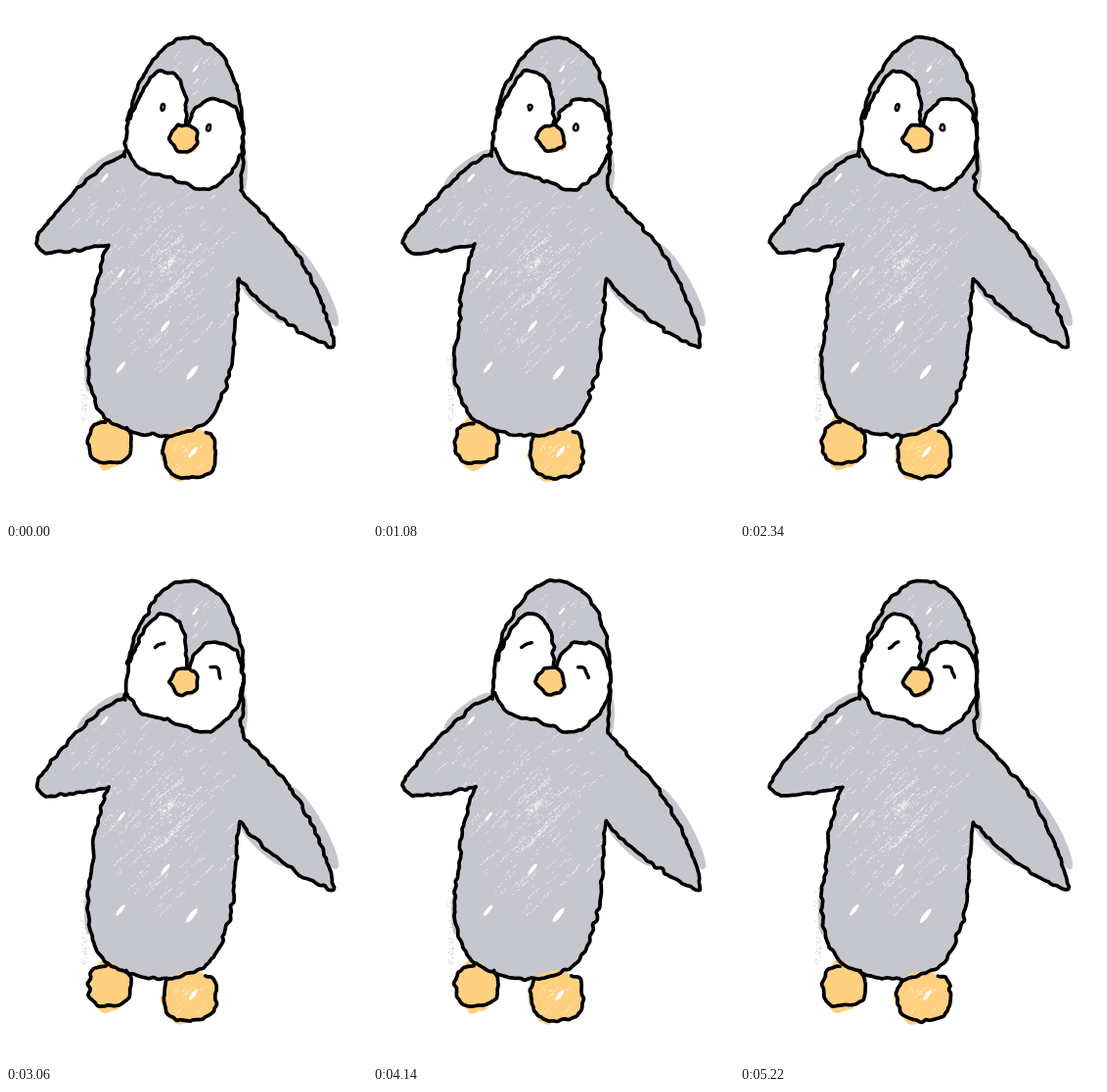
An HTML page with a canvas for the animation above (5400 ms loop, 369 by 526 pixels).

```html
<!DOCTYPE html>
<html lang="en">
<head>
<meta charset="utf-8">
<title>Penguin</title>
<style>
  html, body { margin: 0; width: 100%; height: 100%; overflow: hidden; background: #fff; }
  canvas { display: block; }
</style>
</head>
<body>
<canvas id="stage" width="369" height="526"></canvas>
<script>
const ctx = document.getElementById('stage').getContext('2d');
const STEP = 180, COUNT = 30, SHUT = 15;
const GREY = '#c6c6ce', ORANGE = '#ffd080', INK = '#000', PAPER = '#fff';

function hash(x, y, s) {
  let h = Math.imul(x, 374761393) ^ Math.imul(y, 668265263) ^ Math.imul(s + 7, 1442695041);
  h = Math.imul(h ^ (h >>> 13), 1274126177);
  return ((h ^ (h >>> 16)) >>> 0) / 2147483648 - 1;
}

function noise(x, y, s) {
  const ix = Math.floor(x), iy = Math.floor(y);
  const ease = v => v * v * (3 - 2 * v);
  const u = ease(x - ix), v = ease(y - iy);
  const row = j => hash(ix, j, s) * (1 - u) + hash(ix + 1, j, s) * u;
  return row(iy) * (1 - v) + row(iy + 1) * v;
}

// Fixed hand wobble plus a boil that changes on each step
function warp(x, y, n, amp) {
  const shift = s => amp * (1.1 * noise(x / 6, y / 6, s) + 1.3 * noise(x / 5, y / 5, s + 10 + n * 2));
  return [x + shift(0), y + shift(1)];
}

let seed = 41;
function rand(min = 0, max = 1) {
  seed = (Math.imul(seed, 1664525) + 1013904223) >>> 0;
  return min + (max - min) * seed / 4294967296;
}

// Smooth curve through a few key points
function curve(...keys) {
  const at = i => keys[Math.max(0, Math.min(keys.length - 1, i))];
  const out = [];
  for (let i = 0; i < keys.length - 1; i++) {
    const [a, b, c, d] = [at(i - 1), at(i), at(i + 1), at(i + 2)];
    const parts = Math.max(2, Math.ceil(Math.hypot(c[0] - b[0], c[1] - b[1]) / 2));
    for (let k = 0; k < parts; k++) {
      const t = k / parts;
      out.push([0, 1].map(j => b[j] + 0.5 * t * (c[j] - a[j] +
        t * (2 * a[j] - 5 * b[j] + 4 * c[j] - d[j] + t * (3 * (b[j] - c[j]) + d[j] - a[j])))));
    }
  }
  out.push(at(keys.length));
  return out;
}

// Ellipse arc with soft corners
function blob(cx, cy, rx, ry, from = 0, to = Math.PI * 2, corners = 5) {
  const out = [], parts = Math.ceil((to - from) * Math.max(rx, ry) / 2);
  for (let k = 0; k <= parts; k++) {
    const a = from + (to - from) * k / parts;
    const r = 1 - 0.05 * Math.cos(corners * a);
    out.push([cx + rx * r * Math.cos(a), cy + ry * r * Math.sin(a)]);
  }
  return out;
}

const head = curve([122, 153], [125, 117], [138, 76], [163, 42], [190, 33], [221, 50], [238, 90], [242, 132], [240, 188]);
const wingRight = curve([240, 188], [261, 210], [295, 250], [319, 295], [335, 341], [327, 346], [300, 332], [262, 303], [238, 278]);
const belly = curve([238, 278], [234, 330], [228, 378], [206, 424], [160, 439], [105, 423], [84, 380], [87, 330], [93, 280], [104, 244]);
const wingLeft = curve([105, 243], [66, 250], [40, 251], [32, 236], [67, 194], [100, 163], [122, 151]);
const faceLeft = curve([128, 114], [139, 87], [154, 68], [172, 70], [183, 90], [184, 121]);
const faceRight = curve([187, 121], [196, 103], [215, 95], [235, 105], [242, 130]);
const chin = curve([242, 130], [236, 160], [207, 187], [169, 176], [139, 167], [125, 147]);
const beak = blob(182, 135, 14, 13.5);
const feet = [blob(106, 446, 22.5, 22, -0.7, 4.55, 4), blob(188, 457, 28.5, 26, -1, 3.86, 4)];

const body = [...head, ...wingRight, ...belly, ...wingLeft];
const face = [...faceLeft, ...faceRight, ...chin];
const lines = [head, wingRight, belly, wingLeft, faceLeft, faceRight, chin, ...feet, beak];
const openEyes = [[160, 104], [207, 124]].map(([x, y]) => blob(x, y, 1.8, 3.5, 0, Math.PI * 2, 4));
const shutEyes = [curve([152, 101], [156, 98], [162, 96]), curve([209, 120], [216, 121], [220, 131])];

// Crayon colour that strays over the lines: x, y, radii, turn
const strays = [[97, 166, 30, 8, -0.65], [315, 285, 48, 10, 1.06], [262, 303, 30, 6, 0.75], [242, 168, 5, 22, 0], [84, 370, 4, 24, 0]];
const footStrays = [blob(104, 456, 16, 18), blob(102, 434, 13, 14), blob(180, 459, 21, 26), blob(190, 443, 18, 12), blob(186, 139, 11, 12)];

// Bare paper left between diagonal crayon strokes
const grain = [];
function scratch(x, y, length, density) {
  for (let k = -length / 2; k < length / 2; k++) {
    if (rand() < density) grain.push([x + k * 0.72 + rand(), y - k * 0.7 + rand()]);
  }
}
for (let i = 0; i < 190; i++) {
  const a = rand(0, Math.PI * 2), r = rand();
  scratch(165 + 75 * r * Math.cos(a), 262 + 105 * r * Math.sin(a), rand(4, 22), 0.42);
}
for (let i = 0; i < 9; i++) scratch(134 + i * 7, 310 - i * 4 + rand(-9, 9), rand(30, 60), 0.5);
for (let i = 0; i < 14; i++) {
  scratch(rand(172, 222), rand(48, 92), rand(5, 12), 0.5);
  scratch(rand(70, 120), rand(170, 225), rand(6, 18), 0.4);
  scratch(rand(170, 208), rand(446, 474), rand(4, 11), 0.4);
}
const dust = Array.from({ length: 55 }, () => [rand(77, 83), rand(345, 425)]);
const flecks = [[101, 175, 11], [118, 273, 11], [117, 369, 14], [190, 374, 18], [163, 327, 14], [193, 64, 9], [191, 456, 14]];

function trace(points, n, amp) {
  ctx.beginPath();
  for (const [x, y] of points) ctx.lineTo(...warp(x, y, n, amp));
}

function fill(points, color, n, amp = 1) {
  trace(points, n, amp);
  ctx.fillStyle = color;
  ctx.fill();
}

function stroke(points, n, width = 3.7, amp = 1) {
  trace(points, n, amp);
  ctx.strokeStyle = INK;
  ctx.lineWidth = width;
  ctx.stroke();
}

function speckle(list, color, n) {
  ctx.fillStyle = color;
  for (const [x, y] of list) {
    const [a, b] = warp(x, y, n, 0.5);
    ctx.fillRect(a - 0.5, b - 0.5, 1, 1);
  }
}

function ellipse(x, y, rx, ry, turn, color) {
  ctx.beginPath();
  ctx.ellipse(x, y, rx, ry, turn, 0, Math.PI * 2);
  ctx.fillStyle = color;
  ctx.fill();
}

function draw(n) {
  ctx.fillStyle = PAPER;
  ctx.fillRect(0, 0, 369, 526);
  ctx.lineCap = ctx.lineJoin = 'round';

  for (const s of strays) ellipse(...s, GREY);
  fill(body, GREY, n);
  speckle(dust, GREY, n);
  fill(face, PAPER, n);
  for (const p of [...footStrays, ...feet, beak]) fill(p, ORANGE, n);
  speckle(grain, 'rgba(255,255,255,0.7)', n);
  for (const [x, y, size] of flecks) ellipse(...warp(x, y, n, 0.5), size / 2, size / 7, -0.9, PAPER);

  for (const p of lines) stroke(p, n);
  if (n < SHUT) {
    for (const p of openEyes) stroke(p, n, 2.6, 0.7);
  } else {
    for (const p of shutEyes) stroke(p, n, 3.5, 0.7);
  }
}

let shown = -1, start = null;
function tick(now) {
  if (start === null) start = now;
  const n = Math.floor((now - start) / STEP) % COUNT;
  if (n !== shown) draw(shown = n);
  requestAnimationFrame(tick);
}
requestAnimationFrame(tick);
</script>
</body>
</html>
```
